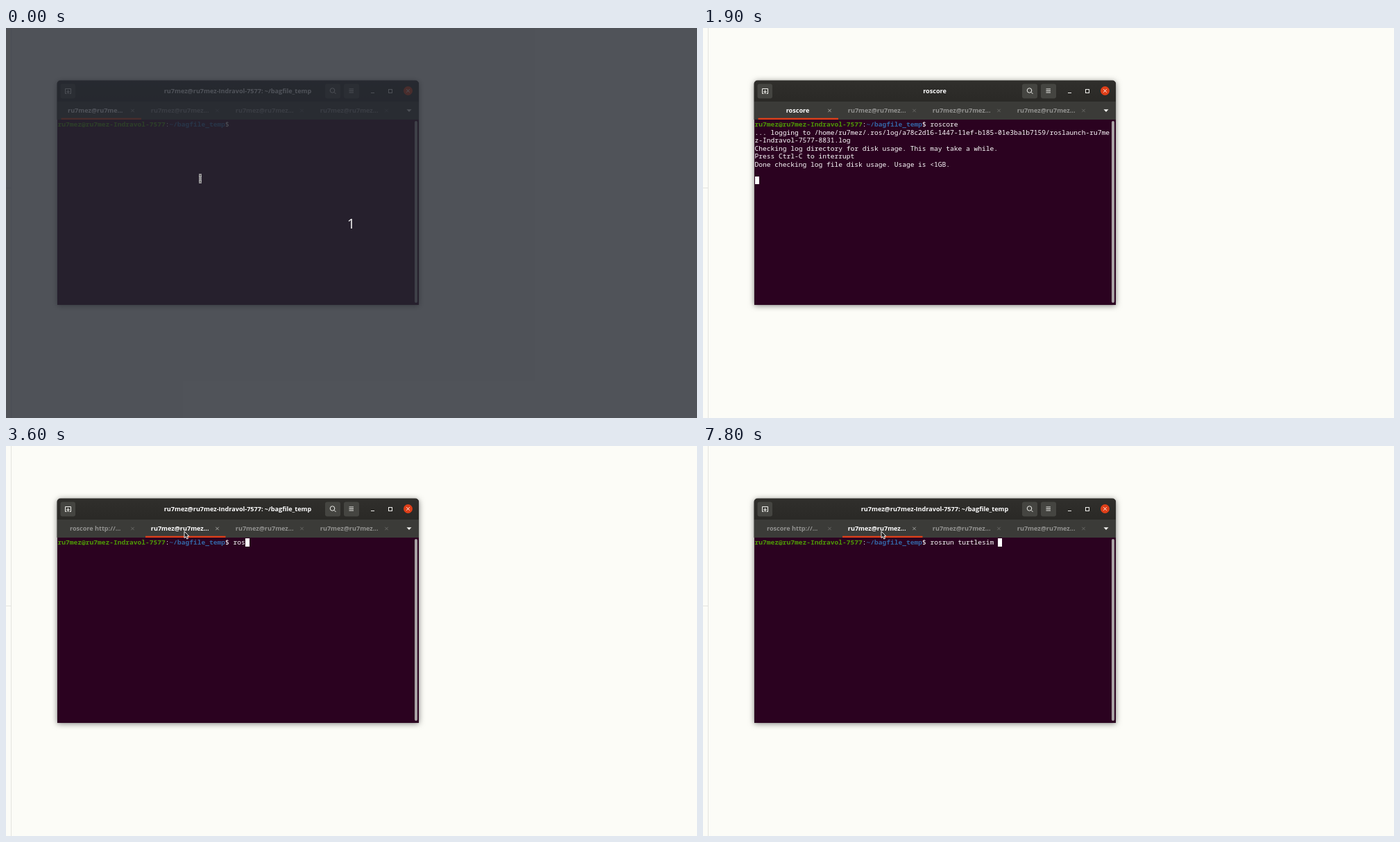
Recreate the animation shown at these times as an HTML page. Size 996 px wide and 562 px high, loop 8000 ms.

```html
<!DOCTYPE html>
<html lang="en">
<head>
<meta charset="utf-8">
<title>Terminal session</title>
<style>
  html, body { margin: 0; width: 100%; height: 100%; overflow: hidden; background: #fcfcf7; }
  #stage { position: relative; width: 996px; height: 562px; overflow: hidden; }
  #stage > * { position: absolute; }
  svg { left: 0; top: 0; }
  #window {
    left: 73.5px; top: 75.5px; width: 521.5px; height: 323px;
    border-radius: 5px 5px 0 0; background: #2b0220;
    box-shadow: 0 1px 8px rgba(0, 0, 0, .5), 0 0 1px rgba(0, 0, 0, .6);
  }
  svg text { font: bold 9.08px "Open Sans", "Noto Sans", sans-serif; text-anchor: middle; }
  #screen {
    left: 74.5px; top: 133px; margin: 0; color: #fff;
    font: 9.583px/11.5px "Noto Sans Mono", "DejaVu Sans Mono", monospace;
  }
  .user { color: #4e9a06; }
  .path { color: #3465a4; }
  #block { width: 6px; height: 11.5px; background: #fff; }
  #thumb { left: 588.5px; width: 4px; border-radius: 2px; background: #a8a2a4; }
  #dim { inset: 0; background: rgba(37, 41, 49, .8); }
</style>
</head>
<body>
<div id="stage">
  <svg width="996" height="562">
    <path d="M7.5 0V562M0 230.5H7" stroke="#e4e4e0"/>
  </svg>
  <div id="window"></div>
  <svg width="996" height="562" fill="none">
    <defs>
      <linearGradient id="bar" x2="0" y2="1">
        <stop stop-color="#302f2c"/><stop offset="1" stop-color="#2a2926"/>
      </linearGradient>
    </defs>
    <path d="M73.5 106V80.5a5 5 0 0 1 5-5H590a5 5 0 0 1 5 5V106Z" fill="url(#bar)"/>
    <path d="M73.5 106H595V132H73.5Z" fill="#3b3b38"/>
    <g fill="#454541">
      <rect x="78.5" y="80.5" width="21.5" height="21" rx="3"/>
      <rect x="460" y="80.5" width="22" height="21" rx="3"/>
      <rect x="487" y="80.5" width="22" height="21" rx="3"/>
    </g>
    <g stroke="#f2f2ee">
      <path d="M87.5 94.5H85.5V87.5H93.5V94.5H91.5M89.5 89.5V95M87 92H92"/>
      <circle cx="470.5" cy="90" r="3.3"/><path d="M473 92.500L475.500 95"/>
      <path d="M494.500 88H501M494.500 90.500H501M494.500 93H501"/>
      <path d="M526 93.500H531"/><rect x="551.500" y="88.500" width="5" height="5"/>
    </g>
    <circle cx="579.5" cy="90.500" r="6.500" fill="#df3f19"/>
    <path d="M577.300 88.300L581.700 92.700M581.700 88.300L577.300 92.700" stroke="#fff"/>
    <path d="M577.500 117.300H584.500L581 121Z" fill="#f2f2ee"/>
    <text id="title" x="334" y="94" fill="#fff"></text>
    <g id="tabs"></g>
    <rect id="hover" x="201" y="130" width="116" height="2" fill="#2d2d2a"/>
    <rect id="underline" y="129.700" width="115.500" height="2.300" fill="#df3f19"/>
  </svg>
  <pre id="screen"></pre>
  <div id="block"></div>
  <div id="thumb"></div>
  <div id="dim"></div>
  <svg width="996" height="562">
    <text id="count" x="497.500" y="289" fill="#f4f4f4" style="font-size:20px;font-weight:400">1</text>
    <g id="pointer">
      <g id="beam" fill="none">
        <path d="M-2 -5H2M-2 5H2M0 -5V5" stroke="#fff" stroke-width="3"/>
        <path d="M-2 -5H2M-2 5H2M0 -5V5" stroke="#222"/>
      </g>
      <path id="arrow" d="M0 0V9.500L2.200 7.500L3.800 11L5.500 10.200L4 6.900H6.800Z" fill="#222" stroke="#fff" stroke-width=".9"/>
    </g>
  </svg>
</div>
<script>
const $ = id => document.getElementById(id);
const LOOP = 8000, CELL = 5.75, ROW = 11.5, ROWS = 23, TAB_PITCH = 122;
const user = "ru7mez", host = user + "-Indravol-7577";
const folder = "~/bagfile_temp", runId = "a78c2d16-1447-11ef-b185-01e3ba1b7159";
const promptWidth = `${user}@${host}:${folder}$ `.length;
const promptLine = typed =>
  `<b class="user">${user}@${host}</b>:<b class="path">${folder}</b>$ ${typed}`;

// Lines starting with "!" are bold.
const log = [
  promptLine("roscore"),
  `... logging to /home/${user}/.ros/log/${runId}/roslaunch-${user.slice(0, 5)}`,
  `${host.slice(5)}-8831.log`,
  "Checking log directory for disk usage. This may take a while.",
  "Press Ctrl-C to interrupt",
  "Done checking log file disk usage. Usage is &lt;1GB.",
  "",
  `!started roslaunch server http://${host}:37049/`,
  "ros_comm version 1.16.0",
  "", "",
  "SUMMARY", "========",
  "",
  "PARAMETERS", " * /rosdistro: noetic", " * /rosversion: 1.16.0",
  "",
  "NODES",
  "",
  "auto-starting new master",
  "!process[master]: started with pid [8839]",
  `!ROS_MASTER_URI=http://${host}:11311/`,
  "",
  `!setting /run_id to ${runId}`,
  "!process[rosout-1]: started with pid [8849]",
  "started core service [/rosout]"
].map(line => line[0] === "!" ? `<b>${line.slice(1)}</b>` : line);

// Each entry: start time in ms, then the value held from then on.
const firstCommand = [[0, ""], [400, "r"], [700, "ros"], [1100, "rosc"],
  [1300, "rosco"], [1400, "roscor"], [1500, "roscore"]];
const logLength = [[1700, 1], [1900, 7], [2100, 21], [2200, 23], [2400, 25], [2500, 27]];
const secondCommand = [[2900, ""], [3300, "r"], [3500, "ro"], [3600, "ros"],
  [4200, "rosr"], [4300, "rosru"], [4900, "rosrun "], [5300, "rosrun t"],
  [5400, "rosrun tru"], [5800, "rosrun tr"], [6000, "rosrun t"], [6400, "rosrun tu"],
  [6900, "rosrun turt"], [7000, "rosrun turtle"], [7600, "rosrun turtlesi"],
  [7800, "rosrun turtlesim "]];
const at = (track, t) => track.findLast(([start]) => t >= start)[1];
const show = (id, on) => $(id).style.visibility = on ? "visible" : "hidden";

$("tabs").innerHTML = [0, 1, 2, 3].map(i => {
  const x = 180.3 + i * TAB_PITCH;
  return `<text x="${128.700 + i * TAB_PITCH}" y="122">${user}@${user}...</text>
    <path d="M${x} 116.800l4.400 4.400m0 -4.400l-4.400 4.400"/>`;
}).join("");
const labels = [...$("tabs").querySelectorAll("text")];
const closers = [...$("tabs").querySelectorAll("path")];

function drawScreen(t) {
  const logging = t >= 1700 && t < 2900;
  const typed = at(t < 1700 ? firstCommand : secondCommand, Math.max(t, t < 1700 ? 0 : 2900));
  const lines = logging ? log.slice(0, at(logLength, t)) : [promptLine(typed)];
  const total = Math.max(ROWS, lines.length + 1), hidden = total - ROWS;
  const column = logging ? 0 : promptWidth + typed.length;
  const row = logging ? lines.length - hidden : 0;

  $("screen").innerHTML = lines.slice(hidden).join("\n");
  $("block").style.left = 74.5 + column * CELL + "px";
  $("block").style.top = 133 + row * ROW + "px";
  show("block", t >= 100 && !(t >= 2600 && t < 2900));
  $("thumb").style.top = 134 + 262 * hidden / total + "px";
  $("thumb").style.height = 262 * ROWS / total + "px";
}

function drawTabs(t) {
  const active = t < 2900 ? 0 : 1;
  const running = t >= 1900 && t < 2100;
  $("title").textContent = running ? "roscore"
    : t >= 2100 && t < 2900 ? `roscore http://${host}:11311/`
    : `${user}@${host}: ${folder}`;
  labels[0].textContent = t < 1900 ? `${user}@${user.slice(0, 5)}...`
    : running ? "roscore" : "roscore http://...";
  labels[0].setAttribute("x", running ? 136.5 : 128.7);
  labels.forEach((label, i) => {
    label.setAttribute("fill", i === active ? "#fff" : "#929290");
    closers[i].setAttribute("stroke", i === active ? "#a5a5a1" : "#696966");
  });
  $("underline").setAttribute("x", active ? 201 : 79.5);
}

function drawPointer(t) {
  const p = Math.min(1, Math.max(0, (t - 2200) / 400));
  const ease = p * p * (3 - 2 * p);
  const x = 280 - 23 * ease, y = 217 - 94 * ease;
  const overTabs = y < 132;
  $("pointer").setAttribute("transform", `translate(${x} ${y})`);
  show("beam", !overTabs && (t < 500 || t >= 2200));
  show("arrow", overTabs);
  show("hover", overTabs && t < 2900);
}

function frame() {
  const t = Math.floor(performance.now() % LOOP / 100) * 100;
  drawScreen(t);
  drawTabs(t);
  drawPointer(t);
  show("dim", t < 100);
  show("count", t < 100);
  requestAnimationFrame(frame);
}
frame();
</script>
</body>
</html>
```
